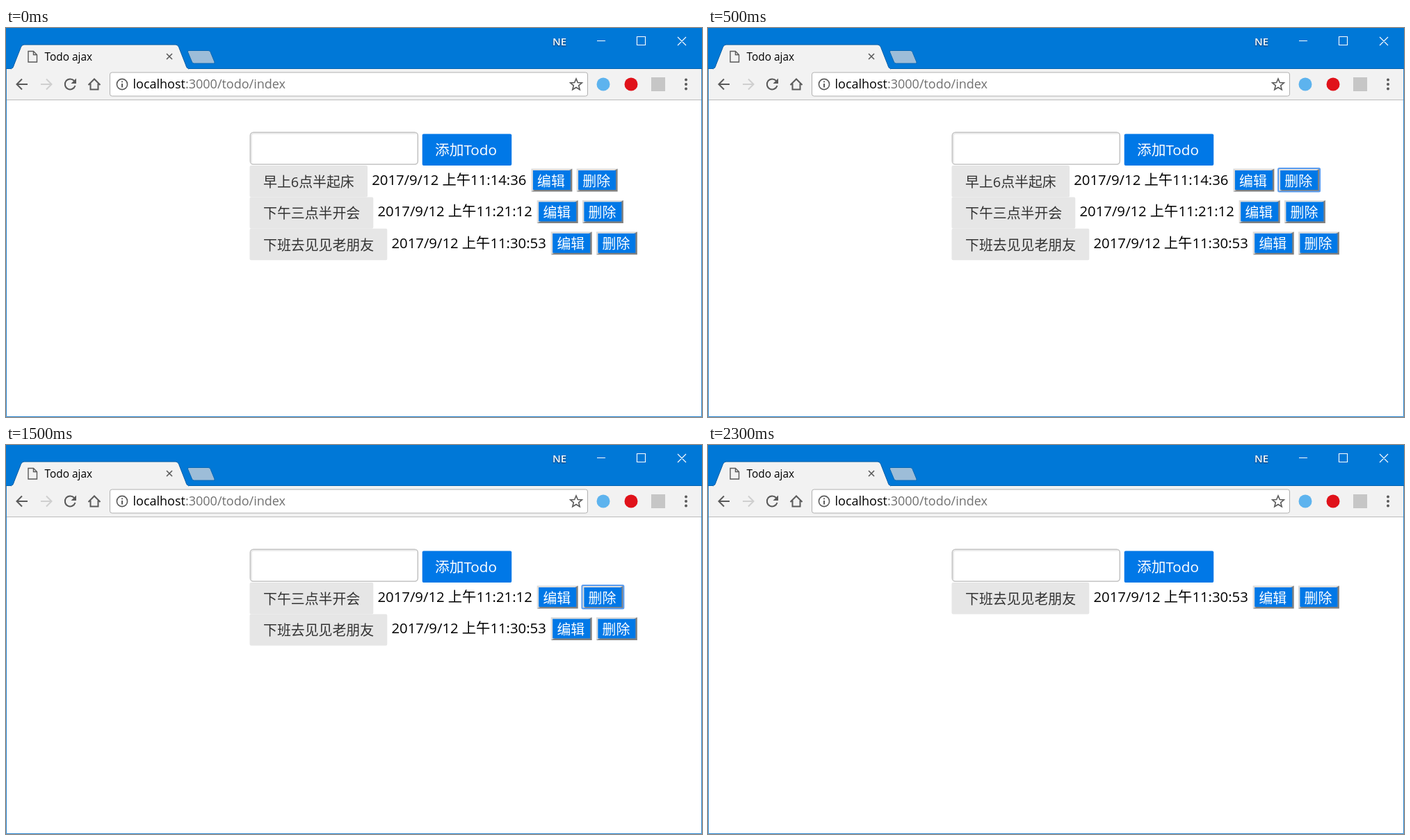
Recreate the animation shown at these times as an HTML page. Size 1001x560 px, loop 2.5 s.

```html
<!DOCTYPE html>
<html lang="zh-CN">
<head>
<meta charset="utf-8">
<title>Todo ajax</title>
<style>
  html, body { margin: 0; width: 100%; height: 100%; overflow: hidden; background: #fff; }
  svg { display: block; font: 20px "Open Sans", "Noto Sans CJK SC", "Noto Sans CJK", sans-serif; }
  .icon { fill: none; stroke: #5a5a5a; stroke-width: 2; }
  .thin { fill: none; stroke: #fff; stroke-width: 1.1; }
</style>
</head>
<body>
<svg width="1001" height="560" viewBox="0 0 1001 560">
  <!-- Window frame and tabs -->
  <rect width="1001" height="560" fill="#fff"/>
  <path d="M.5 58V559.5H1000.5V58" fill="none" stroke="#2b86d0"/>
  <rect width="1001" height="59" fill="#0078d7"/>
  <path d="M0 58.5H1001" stroke="#0062b0"/>
  <rect x="1" y="59" width="999" height="44" fill="#f2f2f2"/>
  <path d="M1 103.5H1000" stroke="#bcbcbc"/>
  <path d="M7 59C10 58 10.5 56 11.5 53L21.5 27.5Q23 24 26 24H244Q247 24 248.500 27.500L258.500 53C259.500 56 260 58 263 59" fill="#f2f2f2" stroke="#005ca6"/>
  <path d="M8.500 59H261.500" stroke="#f2f2f2" stroke-width="2"/>
  <path d="M263 32.500H291Q293 32.500 294 34.500L300 49Q300.500 51 298.500 51H270.500Q268.500 51 267.500 49L261.500 34.500Q261 32.500 263 32.500Z" fill="#9dbdd8" stroke="#0867b3"/>
  <path d="M32 33.500H39.500L44.500 38.500V49H32ZM39.500 33.500V38.500H44.500" class="icon" style="stroke-width:1.4"/>
  <path d="M231 37L239 45M239 37L231 45" class="icon" style="stroke-width:1.6"/>
  <text x="55.500" y="46.500" font-size="15.400" fill="#000">Todo ajax</text>
  <text x="786" y="25" font-size="15" font-weight="600" fill="#fff" style="text-shadow:0 1px 2px #002a50">NE</text>
  <path d="M850 18.500H862M907.500 12.500H919.500V24.500H907.500ZM966 13L978 25M978 13L966 25" class="thin"/>

  <!-- Toolbar -->
  <path d="M31 81H16M23 73.500L15.500 81L23 88.500" class="icon"/>
  <path d="M50 81H65M58 73.500L65.500 81L58 88.500" class="icon" style="stroke:#cfcfcf"/>
  <path d="M98 76A7.500 7.500 0 1 0 99.500 83" class="icon"/>
  <path d="M101 72.500V80H93.500Z" fill="#5a5a5a"/>
  <path d="M118.500 82L127 73.500L135.500 82M121.500 80V88.500H132.500V80" class="icon"/>
  <rect x="149.500" y="64" width="687" height="34" rx="3" fill="#fff" stroke="#b0b0b0"/>
  <circle cx="167" cy="81" r="7.600" class="icon" style="stroke-width:1.600"/>
  <path d="M167 80V85.500M167 76.500V78.300" class="icon"/>
  <text x="182.500" y="87" font-size="18" fill="#000">localhost<tspan fill="#707070">:3000/todo/index</tspan></text>
  <path d="M820 73L822.300 78.600L828.300 79L823.700 82.900L825.200 88.700L820 85.500L814.800 88.700L816.300 82.900L811.700 79L817.700 78.600Z" class="icon" style="stroke-width:1.600"/>
  <circle cx="859" cy="81" r="9.500" fill="#5db3ee"/>
  <circle cx="899" cy="81" r="9.500" fill="#e0121a"/>
  <rect x="928" y="71" width="20" height="20" fill="#c6c6c6"/>
  <g fill="#5a5a5a"><circle cx="978" cy="74.500" r="2"/><circle cx="978" cy="81" r="2"/><circle cx="978" cy="87.500" r="2"/></g>

  <!-- Page -->
  <rect x="351.300" y="150.300" width="241" height="46" rx="4.500" fill="#fff" stroke="#c4c4c4" stroke-width="1.600"/>
  <path d="M353 195V155Q353 152 356 152H590" fill="none" stroke="#e6e6e6" stroke-width="1.600"/>
  <rect x="598.700" y="152.500" width="128.500" height="45.500" rx="2" fill="#0078e7"/>
  <text x="617" y="183" font-size="20.700" fill="#fff">添加Todo</text>
  <g id="list"></g>
</svg>
<script>
const todos = [
  { text: "早上6点半起床", time: "11:14:36", end: 520 },
  { text: "下午三点半开会", time: "11:21:12", end: 528.3 },
  { text: "下班去见见老朋友", time: "11:30:53", end: 548.3 },
];
const STEP = 500, STEPS = 5, ROW = 45.4;
const list = document.getElementById("list");

const label = (x, y, text, fill, size = 19.9) =>
  `<text x="${x}" y="${y}" fill="${fill}" font-size="${size}">${text}</text>`;

function button(x, text, focused) {
  const ring = `<rect x="${x - 0.5}" y="202" width="60" height="33.500" rx="1.500" fill="none" stroke="#5b9df0" stroke-width="2"/>`;
  return `<path d="M${x} 235.500V202.500H${x + 59}Z" fill="#dcdcdc"/>
    <path d="M${x} 235.500H${x + 59}V202.500Z" fill="#808080"/>
    <rect x="${x + 2.5}" y="205" width="54" height="28" fill="#0078e7"/>
    ${label(x + 8.7, 227.5, text, "#fff")}${focused ? ring : ""}`;
}

function row({ text, time, end }, index, focused) {
  return `<g transform="translate(0 ${index * ROW})">
    <rect x="350.500" y="198" width="${end - 350.5}" height="45.400" rx="2" fill="#e6e6e6"/>
    ${label(370, 228.8, text, "#333")}
    ${label(end + 6.2, 226, "2017/9/12 上午" + time, "#000", 20.3)}
    ${button(end + 235.4, "编辑")}${button(end + 300.6, "删除", focused)}
  </g>`;
}

let shown = -1;
function frame(now) {
  const step = Math.floor(now / STEP) % STEPS;
  if (step !== shown) {
    shown = step;
    // Each item is focused for one step, then removed.
    const focused = step % 2 === 1;
    list.innerHTML = todos.slice(step >> 1)
      .map((todo, i) => row(todo, i, focused && i === 0)).join("");
  }
  requestAnimationFrame(frame);
}
frame(performance.now());
</script>
</body>
</html>
```
